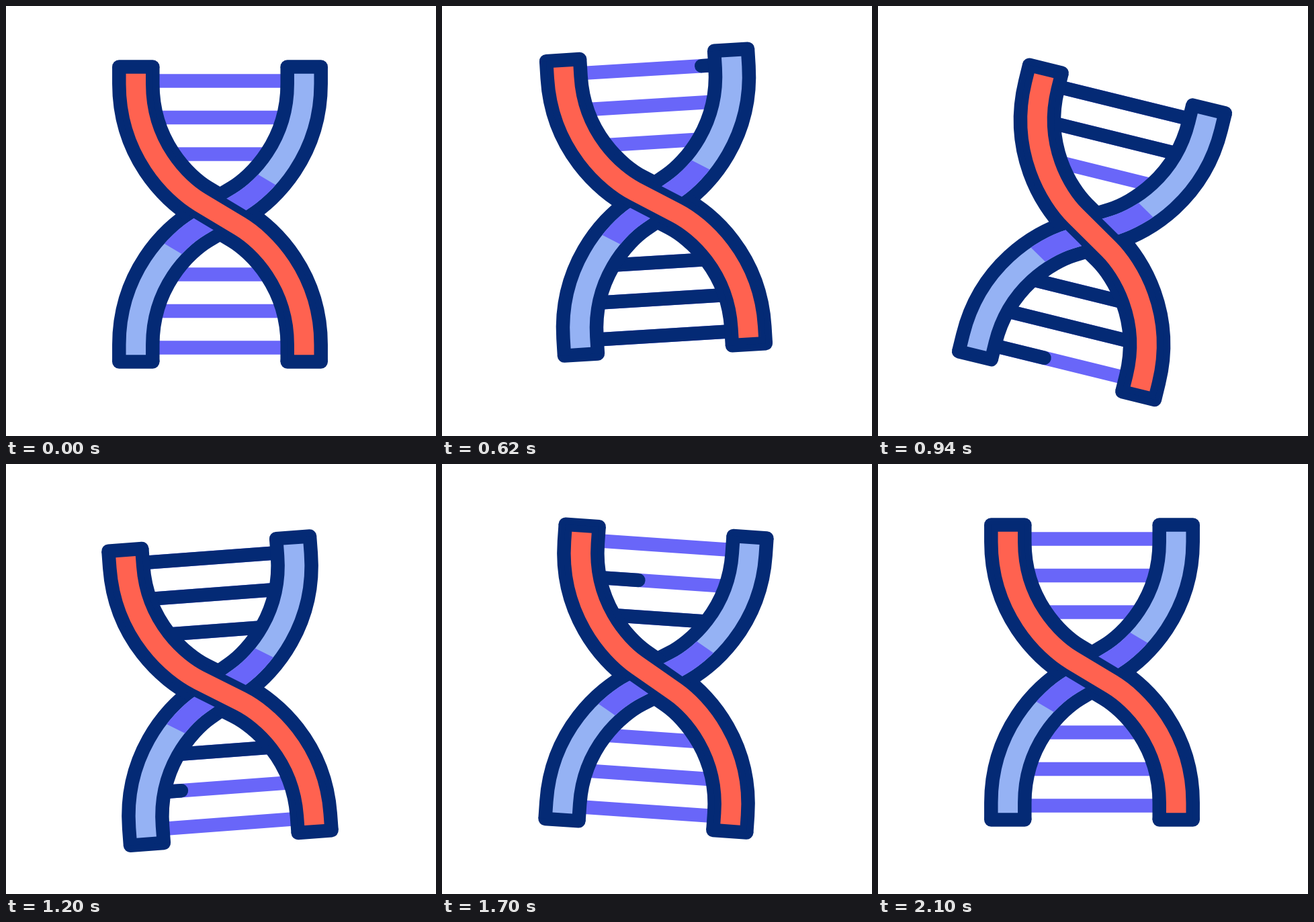
Animation, 640 px wide and 640 px high, one loop 2.4 s. Source, as an HTML page with a canvas:

```html
<!DOCTYPE html>
<html lang="en">
<head>
<meta charset="utf-8">
<title>DNA</title>
<style>
html, body { margin: 0; width: 100%; height: 100%; overflow: hidden; background: #fff; }
canvas { display: block; width: 640px; height: 640px; }
</style>
</head>
<body>
<canvas id="stage" width="640" height="640"></canvas>
<script>
const ctx = document.getElementById('stage').getContext('2d');
const LOOP = 2400, STEP = 20;
const NAVY = '#042a75', RED = '#ff6250', BLUE = '#95b2f4', PURPLE = '#6966f9';
const LINE = 20.5, CORE = 29.5, RIM = CORE + LINE, BAND = RIM + LINE;
const SIDE = 125.2, END = 219.6, HALF = 100;
const TRACE = 170, WIPE = 190;

// Turning points [time, value] of the swing and the bounce
const TILT = [[0, 0], [435, -18.3], [842, 16.2], [1328, -8.2], [1667, 4], [2100, 0]];
const LIFT = [[0, 0], [376, 55], [700, -30], [1097, 56], [1331, -14], [1600, 15], [1833, 0]];

const clamp = v => Math.max(0, Math.min(1, v));
const ease = p => (1 - Math.cos(Math.PI * p)) / 2;

function track(keys, t) {
  const i = keys.findIndex(k => k[0] > t);
  if (i < 0) return 0;
  const [t0, v0] = keys[i - 1], [t1, v1] = keys[i];
  return v0 + (v1 - v0) * ease((t - t0) / (t1 - t0));
}

function stroke(width, color, cap = 'butt') {
  ctx.lineCap = cap;
  ctx.lineWidth = width;
  ctx.strokeStyle = color;
  ctx.stroke();
}

function line(x0, x1, y, color, cap) {
  ctx.beginPath();
  ctx.moveTo(x0, y);
  ctx.lineTo(x1, y);
  stroke(LINE, color, cap);
}

// Rungs 0-2 go up from the bottom end, 3-5 go down from the top end
function rung(i, t) {
  const y = (i < 3 ? 1 : -1) * (198.5 - 54.5 * (i % 3));
  const tip = clamp((t - 135 - 156 * i) / TRACE);
  const tail = clamp((t - 822 - 218 * i ** 0.89) / WIPE);
  const at = p => HALF * (1 - 2 * p);
  line(-HALF, HALF, y, PURPLE);
  if (tip > tail) line(at(tip), at(tail), y, NAVY, 'round');
}

// side -1 runs from top left to bottom right, side 1 is its mirror image
function curve(side, end, width, color) {
  const x = side * SIDE, bend = side * 64.3, mid = side * 30;
  ctx.beginPath();
  ctx.moveTo(x, -end);
  ctx.lineTo(x, -194);
  ctx.bezierCurveTo(x, -98, bend, -38.6, mid, -18);
  ctx.lineTo(-mid, 18);
  ctx.bezierCurveTo(-bend, 38.6, -x, 98, -x, 194);
  ctx.lineTo(-x, end);
  stroke(width, color);
}

function outline(side) {
  ctx.fillStyle = NAVY;
  for (const s of [-1, 1]) {
    ctx.beginPath();
    ctx.roundRect(-s * side * SIDE - BAND / 2, s * END - LINE / 2, BAND, LINE, LINE / 2);
    ctx.fill();
  }
  curve(side, END, BAND, NAVY);
}

function core(side, color) {
  curve(side, END - LINE / 2, CORE, color);
}

function shade() {
  ctx.save();
  ctx.beginPath();
  ctx.moveTo(36, -71.5);
  ctx.lineTo(105, -30.5);
  ctx.lineTo(-36, 71.5);
  ctx.lineTo(-105, 30.5);
  ctx.clip();
  core(1, PURPLE);
  ctx.restore();
}

function draw(t) {
  ctx.setTransform(1, 0, 0, 1, 0, 0);
  ctx.fillStyle = '#fff';
  ctx.fillRect(0, 0, 640, 640);
  ctx.translate(318.5, 310 + track(LIFT, t));
  ctx.rotate(track(TILT, t) * Math.PI / 180);
  for (let i = 0; i < 6; i++) rung(i, t);
  outline(1);
  outline(-1);
  core(1, BLUE);
  shade();
  // the front strand covers the back one with a thinner rim
  curve(-1, END, RIM, NAVY);
  core(-1, RED);
}

function tick() {
  const t = performance.now() % LOOP;
  draw(Math.floor(t / STEP) * STEP);
  requestAnimationFrame(tick);
}
tick();
</script>
</body>
</html>
```
